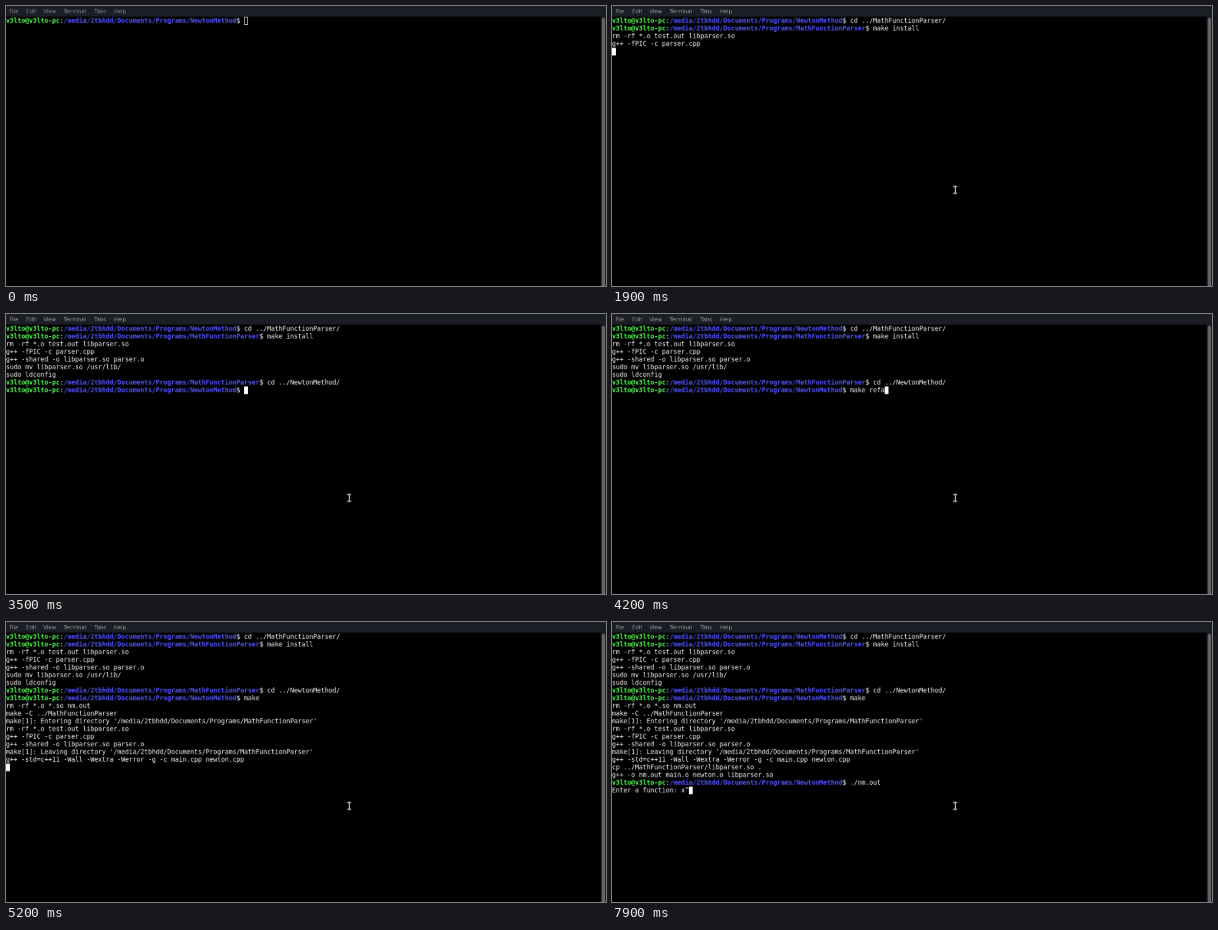
These frames come from a looping animation (600 px wide and 280 px high, 8000 ms). An HTML page with a canvas:

```html
<!DOCTYPE html>
<html lang="en">
<head>
<meta charset="utf-8">
<title>Terminal session</title>
<style>
  html, body { margin: 0; width: 100%; height: 100%; overflow: hidden; background: #000; }
  canvas { display: block; width: 600px; height: 280px; }
</style>
</head>
<body>
<canvas id="stage" width="600" height="280"></canvas>
<script>
const LOOP = 8000, SCALE = 0.48;
const CELL_W = 8, CELL_H = 16, TOP = 23;
const HOST = 'v3lto@v3lto-pc';
const ROOT = '/media/2tbhdd/Documents/Programs/';
const GREEN = '#54ff54', BLUE = '#5454ff', WHITE = '#ffffff';
const MONO = '"DejaVu Sans Mono", monospace';

const stage = document.getElementById('stage').getContext('2d');
// The desktop is drawn at full size, then scaled down to the stage.
const desk = document.createElement('canvas');
desk.width = 1250;
desk.height = 584;
const ctx = desk.getContext('2d');

const prompt = dir => ({ dir, cmd: '' });
const nm = 'NewtonMethod', parser = 'MathFunctionParser';

// [time, typed command] or [time, lines to append]
const script = [
  [0, [prompt(nm)]],
  [800, 'c'], [900, 'cd '], [1000, 'cd ..'], [1100, 'cd ../M'], [1200, 'cd ../' + parser + '/'],
  [1300, [prompt(parser)]],
  [1400, 'm'], [1500, 'mak'], [1600, 'make '], [1700, 'make in'], [1800, 'make install '],
  [1900, ['rm -rf *.o test.out libparser.so', 'g++ -fPIC -c parser.cpp', '']],
  [2200, ['g++ -shared -o libparser.so parser.o', 'sudo mv libparser.so /usr/lib/',
          'sudo ldconfig', prompt(parser)]],
  [2500, 'c'], [2600, 'cd'], [2900, 'cd '], [3000, 'cd .'], [3100, 'cd ..'],
  [3200, 'cd ../'], [3300, 'cd ../N'], [3400, 'cd ../' + nm + '/'],
  [3500, [prompt(nm)]],
  [3600, 'm'], [3700, 'ma'], [3800, 'make'], [3900, 'make '], [4000, 'make re'],
  [4200, 'make refa'], [4300, 'make ref'], [4500, 'make '], [4600, 'make'],
  [4700, ['rm -rf *.o *.so nm.out', 'make -C ../' + parser, '']],
  [4800, [`make[1]: Entering directory '${ROOT}${parser}'`,
          'rm -rf *.o test.out libparser.so', 'g++ -fPIC -c parser.cpp', '']],
  [5000, ['g++ -shared -o libparser.so parser.o', '']],
  [5100, [`make[1]: Leaving directory '${ROOT}${parser}'`, '']],
  [5200, ['g++ -std=c++11 -Wall -Wextra -Werror -g -c main.cpp newton.cpp', '']],
  [5600, ['cp ../' + parser + '/libparser.so .', 'g++ -o nm.out main.o newton.o libparser.so', '']],
  [5700, [prompt(nm)]],
  [5800, '.'], [5900, './'], [6000, './n'], [6300, './nm'], [6500, './nm.o'],
  [6700, './nm.ou'], [6800, './nm.out'], [6900, './nm.out '],
  [7000, [{ text: 'Enter a function: ', cmd: '' }]],
  [7600, 'x'], [7900, 'x^']
];

const menu = [['File', 7], ['Edit', 42], ['View', 78], ['Terminal', 120], ['Tabs', 184], ['Help', 225]];

function rowsAt(t) {
  const rows = [];
  for (const [at, step] of script) {
    if (at > t) break;
    if (typeof step === 'string') {
      rows[rows.length - 1].cmd = step;
      continue;
    }
    // An empty last row only holds the cursor until more output comes.
    if (rows.length && rows[rows.length - 1].text === '') rows.pop();
    for (const line of step) rows.push(typeof line === 'string' ? { text: line, cmd: '' } : { ...line });
  }
  return rows;
}

function write(text, col, row, color, bold) {
  ctx.font = (bold ? 'bold ' : '') + '13.33px ' + MONO;
  ctx.fillStyle = color;
  [...text].forEach((ch, i) => ctx.fillText(ch, (col + i) * CELL_W, TOP + row * CELL_H + 12));
  return col + text.length;
}

function drawRow(line, row) {
  let col = 0;
  if (line.dir) {
    col = write(HOST, col, row, GREEN, true);
    col = write(':', col, row, WHITE);
    col = write(ROOT + line.dir, col, row, BLUE, true);
    col = write('$ ', col, row, WHITE);
  } else {
    col = write(line.text, col, row, WHITE);
  }
  return write(line.cmd, col, row, WHITE);
}

function drawCursor(col, row, focused) {
  const x = col * CELL_W, y = TOP + row * CELL_H;
  ctx.fillStyle = ctx.strokeStyle = WHITE;
  ctx.lineWidth = 1;
  if (focused) ctx.fillRect(x, y, CELL_W, CELL_H);
  else ctx.strokeRect(x + 0.5, y + 0.5, CELL_W - 1, CELL_H - 1);
}

function drawFrame(focused) {
  ctx.fillStyle = '#1b1e25';
  ctx.fillRect(0, 0, 1250, 22);
  ctx.font = '11px "DejaVu Sans", sans-serif';
  ctx.fillStyle = focused ? '#a3a6aa' : '#8c8f94';
  for (const [label, x] of menu) ctx.fillText(label, x, 15);
  ctx.fillStyle = '#1b1e25';
  ctx.fillRect(1239, 22, 11, 562);
  ctx.fillStyle = '#62656a';
  ctx.beginPath();
  ctx.roundRect(1241, 25, 7, 570, 3);
  ctx.fill();
}

function drawPointer(t) {
  if (t < 100) return;
  const left = 1 - Math.min(1, (t - 100) / 500);
  const k = 1 - left ** 3;
  const x = Math.round(600 + 115 * k), y = Math.round(190 + 193 * k);
  const beam = (w, color) => {
    ctx.strokeStyle = color;
    ctx.lineWidth = w;
    ctx.beginPath();
    ctx.moveTo(x - 4, y - 7); ctx.lineTo(x + 4, y - 7);
    ctx.moveTo(x, y - 7); ctx.lineTo(x, y + 7);
    ctx.moveTo(x - 4, y + 7); ctx.lineTo(x + 4, y + 7);
    ctx.stroke();
  };
  beam(4, '#000');
  beam(2, '#e8e8e8');
}

function draw(t) {
  const focused = t >= 200;
  ctx.fillStyle = '#000';
  ctx.fillRect(0, 0, desk.width, desk.height);
  drawFrame(focused);
  const rows = rowsAt(t);
  let col = 0;
  rows.forEach((line, i) => { col = drawRow(line, i); });
  drawCursor(col, rows.length - 1, focused);
  drawPointer(t);
  stage.imageSmoothingQuality = 'high';
  stage.drawImage(desk, 0, 0, desk.width * SCALE, desk.height * SCALE);
}

const start = performance.now();
function tick() {
  const t = (performance.now() - start) % LOOP;
  draw(Math.floor(t / 100) * 100);
  requestAnimationFrame(tick);
}
tick();
</script>
</body>
</html>
```
